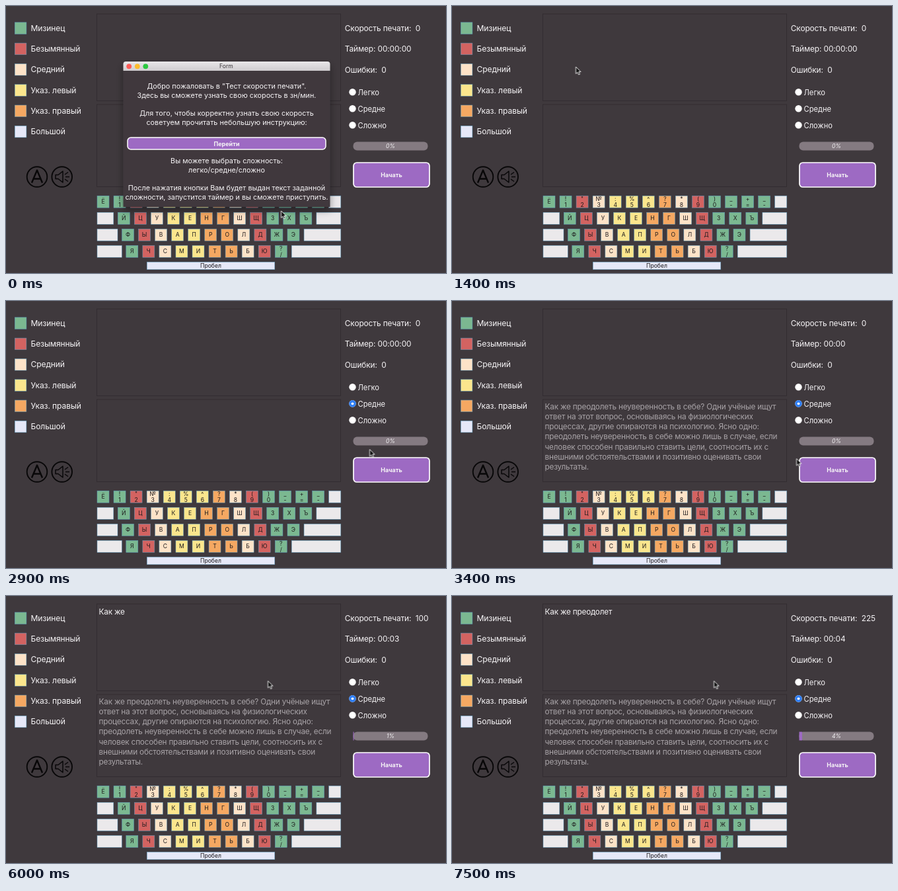
An HTML page that plays this animation: 666 px wide and 404 px high, repeating every 8 s.

```html
<!DOCTYPE html>
<html lang="ru">
<head>
<meta charset="utf-8">
<title>Тест скорости печати</title>
<style>
html, body { margin: 0; width: 100%; height: 100%; overflow: hidden; background: #3f393d; }
svg { display: block; width: 666px; height: 404px; font-family: Inter, "Open Sans", sans-serif; }
text { fill: #f6f4f6; white-space: pre; }
.frame { fill: none; stroke: #302a2e; stroke-width: .8; }
.button { fill: #9d6ac3; stroke: #fff; }
.key { fill: #1d1a1c; }
.tight { letter-spacing: -.018em; }
.snug { letter-spacing: -.01em; }
.icon { fill: none; stroke: #080708; stroke-width: 1.9; stroke-linejoin: round; }
#task text { fill: #a8a3a7; }
#dialog, #hover, #dot, #task, #cursor { animation: 8s -20ms infinite step-end; }
#dialog { animation-name: dialog; }
#hover { animation-name: hover; }
#dot { animation-name: dot; }
#task { animation-name: task; }
#cursor { animation-name: cursor; }
@keyframes dialog { 0% { visibility: visible } 17.5%, 100% { visibility: hidden } }
@keyframes hover { 0% { opacity: 0 } 13.75%, 100% { opacity: 1 } }
@keyframes dot { 0% { visibility: hidden } 31.25%, 100% { visibility: visible } }
@keyframes task { 0% { visibility: hidden } 42.5%, 100% { visibility: visible } }
/* the pointer moves in 100 ms steps */
@keyframes cursor {
  0% { transform: translate(416.5px, 310px); animation-timing-function: steps(4) }
  5% { transform: translate(400px, 290px) }
  6.25% { transform: translate(400px, 290px); animation-timing-function: steps(7) }
  15% { transform: translate(187.5px, 92px) }
  17.5% { transform: translate(187.5px, 92px); animation-timing-function: steps(5) }
  23.75% { transform: translate(529.5px, 186.500px); animation-timing-function: steps(4) }
  28.75% { transform: translate(525px, 157px) }
  30% { transform: translate(525px, 157px); animation-timing-function: steps(5) }
  36.25% { transform: translate(550.5px, 224.5px); animation-timing-function: steps(3) }
  40% { transform: translate(560px, 250px) }
  42.5% { transform: translate(521.5px, 238.5px); animation-timing-function: steps(7) }
  51.25%, 100% { transform: translate(396.5px, 128.5px) }
}
</style>
</head>
<body>
<svg id="stage" viewBox="0 0 666 404">
  <defs>
    <linearGradient id="bar" x2="0" y2="1"><stop stop-color="#e9e7e9"/><stop offset="1" stop-color="#cfcccf"/></linearGradient>
    <filter id="shadow" x="-20%" y="-20%" width="140%" height="150%"><feDropShadow dx="0" dy="5" stdDeviation="6" flood-opacity=".4"/></filter>
  </defs>
  <rect class="frame" x="137.5" y="12" width="369" height="131.5"/>
  <rect class="frame" x="137.5" y="149" width="369" height="124.500"/>
  <g id="panel"></g>
  <g class="icon">
    <circle cx="47" cy="258.5" r="15.3"/>
    <path d="M39 267.5L47 248.5L55 267.5M42 261.5H52" stroke-width="2.4"/>
    <circle cx="84.7" cy="258.5" r="15.3"/>
    <path d="M75 255.5H79L86 250V267L79 261.5H75ZM89 255L94 251.5M90 258.5H96M89 262L94 265.5" stroke-width="1.5"/>
  </g>
  <rect x="525.5" y="205.5" width="113" height="13" rx="6" fill="#847a81"/>
  <rect id="fill" x="525.5" y="205.5" height="13" fill="#9d6ac3"/>
  <rect class="button" x="526" y="237" width="115" height="37" rx="5" stroke-width="1.7"/>
  <g id="keys"></g>
  <g id="task"></g>
  <g id="dialog">
    <path d="M177.5 304V88q0-4 4-4H486.5q4 0 4 4V304Z" fill="#3f393d" filter="url(#shadow)"/>
    <path d="M177.5 98V88q0-4 4-4H486.5q4 0 4 4V98Z" fill="url(#bar)"/>
    <circle cx="186.2" cy="91.3" r="3.9" fill="#fc5b57"/>
    <circle cx="198.8" cy="91.3" r="3.9" fill="#fdbc2e"/>
    <circle cx="211.3" cy="91.3" r="3.9" fill="#2bc840"/>
    <g id="hover" fill="none" stroke="#5a1010">
      <circle cx="186.2" cy="91.3" r="3.9" fill="#b8403c" stroke="none"/>
      <path d="M184.5 89.6l3.4 3.4m0-3.4l-3.4 3.4"/>
      <path d="M196.5 91.3h4.6" stroke="#8a5a08"/>
      <path d="M209.5 93.1l3.6-3.6" stroke="#0a5a14" stroke-width="1.6"/>
    </g>
    <rect class="button" x="184" y="199" width="300" height="18" rx="5" stroke-width="1.5"/>
  </g>
  <path id="cursor" d="M0 0V10.5L2.4 8.3L4.2 12L6 11.2L4.3 7.6H7.5Z" fill="#111" stroke="#fff" stroke-width=".9"/>
</svg>
<script>
const $ = id => document.getElementById(id);
const stage = $('stage'), panel = $('panel'), keys = $('keys'), dialog = $('dialog');

function add(parent, tag, attrs) {
  const el = document.createElementNS('http://www.w3.org/2000/svg', tag);
  for (const name in attrs) el.setAttribute(name, attrs[name]);
  return parent.appendChild(el);
}

// y is the middle of the capitals
function label(parent, x, y, size, str, attrs = {}) {
  const el = add(parent, 'text', { x, y: y + size * .36, 'font-size': size, ...attrs });
  el.textContent = str;
  return el;
}
const mid = { 'text-anchor': 'middle' };
const bold = { ...mid, 'font-weight': 700 };
const tight = { class: 'tight' }, snug = { class: 'snug' };

const color = { g: '#7bb891', r: '#d36361', p: '#fde3c8', y: '#fbe68d', o: '#f5a862', l: '#e6e8f8', w: '#ebe9eb' };
const box = (parent, x, y, width, height, c) =>
  add(parent, 'rect', { x, y, width, height, fill: color[c], stroke: '#5b9cc0', 'stroke-width': .5 });

['Мизинец', 'Безымянный', 'Средний', 'Указ. левый', 'Указ. правый', 'Большой'].forEach((name, i) => {
  const y = 33.5 + i * 31.3;
  box(panel, 13.3, y - 8.7, 17.6, 17.6, 'grpyol'[i]);
  label(panel, 37.5, y, 12.1, name, snug);
});

const speed = label(panel, 512.8, 34, 11.9, '', snug);
const timer = label(panel, 512.8, 65, 11.9, '', snug);
label(panel, 512.8, 96.5, 11.9, 'Ошибки:  0', snug);
['Легко', 'Средне', 'Сложно'].forEach((name, i) => {
  const y = 130.3 + i * 25;
  add(panel, 'circle', { cx: 524.5, cy: y, r: 5.2, fill: '#fff' });
  label(panel, 532.5, y + .5, 11.2, name);
});
const dot = add(panel, 'g', { id: 'dot' });
add(dot, 'circle', { cx: 524.5, cy: 155.3, r: 5.2, fill: '#2f7ff5' });
add(dot, 'circle', { cx: 524.5, cy: 155.3, r: 1.9, fill: '#fff' });

// x of the first key, labels (upper sign first), colours
const rows = [
  [138, 'Ё !1 "2 №3 :4 %5 ^6 ?7 *8 (9 )0 _- += _-', 'ggrpyyyoprgggg'],
  [169.3, 'Й Ц У К Е Н Г Ш Щ З Х Ъ', 'grpyyooprggg'],
  [175.5, 'Ф Ы В А П Р О Л Д Ж Э', 'grpyyooprgg'],
  [181.8, 'Я Ч С М И Т Ь Б Ю ?/', 'grpyyooprg']
];
rows.forEach(([left, names, colors], r) => {
  const y = 287.2 + r * 25.05;
  const list = names.split(' ');
  list.forEach((name, i) => {
    const x = left + i * 25.05;
    box(keys, x, y, 18, 18, colors[i]);
    [...name].forEach((ch, k) =>
      label(keys, x + 9, y + 9 + (name.length > 1 ? k * 9 - 4 : 0), 8.6, ch, { ...mid, class: 'key' }));
  });
  const end = left + list.length * 25.05;
  box(keys, end, y, 506.8 - end, 18, 'w');
  if (r) box(keys, 138, y, left - 144.5, 18, 'w');
});
box(keys, 213.3, 387.3, 193.5, 11.5, 'l');
label(keys, 310, 393.2, 8.6, 'Пробел', { ...mid, class: 'key' });

const lines = [
  'Как же преодолеть неуверенность в себе? Одни учёные ищут',
  'ответ на этот вопрос, основываясь на физиологических',
  'процессах, другие опираются на психологию. Ясно одно:',
  'преодолеть неуверенность в себе можно лишь в случае, если',
  'человек способен правильно ставить цели, соотносить их с',
  'внешними обстоятельствами и позитивно оценивать свои',
  'результаты.'
];
const task = lines.join(' ');
lines.forEach((line, i) => label($('task'), 140.5, 160 + i * 15.07, 11.8, line, tight));
const typed = label(panel, 140.5, 23.4, 11.8, '', tight);

label(dialog, 333.5, 91.3, 8.6, 'Form', { ...mid, style: 'fill:#3a363a' });
[
  [121, 'Добро пожаловать в "Тест скорости печати".'],
  [134.7, 'Здесь вы сможете узнать свою скорость в зн/мин.'],
  [162, 'Для того, чтобы корректно узнать свою скорость'],
  [175.7, 'советуем прочитать небольшую инструкцию:'],
  [234.2, 'Вы можете выбрать сложность:'],
  [248, 'легко/средне/сложно'],
  [275.4, 'После нажатия кнопки Вам будет выдан текст заданной'],
  [289, 'сложности, запустится таймер и вы сможете приступить.']
].forEach(([y, str]) => label(dialog, 334, y, 10.8, str, mid));
label(dialog, 334, 208.3, 9, 'Перейти', bold);

label(keys, 583.5, 255.8, 9, 'Начать', bold);
const percent = label(keys, 582, 212, 8.6, '', { ...mid, 'font-style': 'italic' });

const strokes = [4600, 5100, 5400, 5400, 5700, 5900, 6100, 6200, 6300, 6400, 6600, 6800, 7000, 7200, 7300, 7500];
const ticks = [4100, 5100, 5900, 7000];
const count = (list, t) => list.filter(at => at <= t).length;

let origin;
function draw(now) {
  origin ??= now;
  const t = (now - origin + 20) % 8000;
  const n = count(strokes, t), sec = count(ticks, t);
  const done = Math.floor(n * 100 / task.length);
  const rate = n ? Math.floor((n - 1) * 60 / sec) : 0;
  speed.textContent = 'Скорость печати:  ' + rate;
  timer.textContent = 'Таймер: ' + (t < 3400 ? '00:00:00' : '00:0' + sec);
  typed.textContent = task.slice(0, n);
  percent.textContent = done + '%';
  $('fill').setAttribute('width', done * 1.13);
  requestAnimationFrame(draw);
}
requestAnimationFrame(draw);
</script>
</body>
</html>
```
